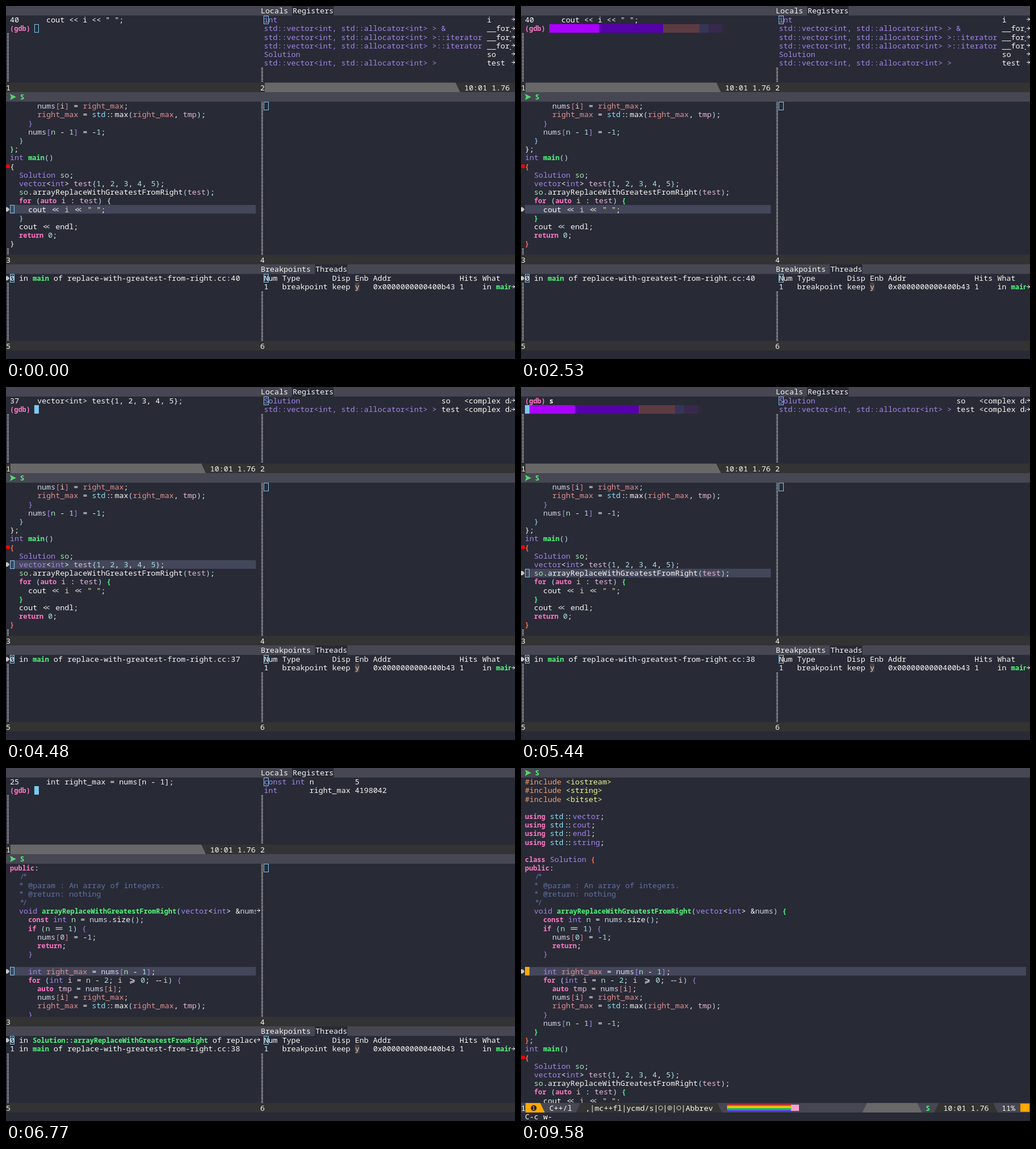
Write an HTML page with a canvas that moves like this. It is 899x623 px and loops after 9.71 s.

```html
<!DOCTYPE html>
<html lang="en">
<head>
<meta charset="utf-8">
<title>Debugger session</title>
<style>
html, body { margin: 0; height: 100%; overflow: hidden; background: #282a36; }
canvas { display: block; }
</style>
</head>
<body>
<canvas id="stage" width="899" height="623"></canvas>
<script>
const ctx = document.getElementById('stage').getContext('2d');
const LOOP = 9710, CELL = 8.04, BOLD_CELL = 7.2, ROW = 15.2, BAR = 16.8;
const LEFT = 7, RIGHT = 455.5, TEXT_W = 442;
const TOPS = [BAR, 152 + BAR, 456 + BAR], BARS = [152 - BAR, 456 - BAR, 608 - BAR];
const BG = '#282a36', HEADER = '#464752', HILITE = '#44475a', DARK = '#333333', GREY = '#686868';
const BLUE = '#7ec8f0', ORANGE = '#ffa800';

// Upper-case keys use the narrower bold face.
const INK = {
  w: '#f8f8f2', W: '#f8f8f2', P: '#ff79c6', G: '#50fa7b', v: '#a585ea', c: '#6272a4', o: '#f0a070',
  y: '#f1fa8c', b: '#8be0f0', n: '#a9e4dc', O: '#ff6e4a', m: '#e0808c', a: '#b4d8ee', r: '#e0908f',
  t: '#e6b8d8', s: '#a8e6b8', i: '#e8ccb8', u: '#d4d4e4', k: '#222222'
};

const SOURCE = `#include <iostream>
#include <string>
#include <bitset>

using std::vector;
using std::cout;
using std::endl;
using std::string;

class Solution {
public:
  /*
  * @param : An array of integers.
  * @return: nothing
  */
  void arrayReplaceWithGreatestFromRight(vector<int> &nums) {
    const int n = nums.size();
    if (n == 1) {
      nums[0] = -1;
      return;
    }

    int right_max = nums[n - 1];
    for (int i = n - 2; i >= 0; --i) {
      auto tmp = nums[i];
      nums[i] = right_max;
      right_max = std::max(right_max, tmp);
    }
    nums[n - 1] = -1;
  }
};
int main()
{
  Solution so;
  vector<int> test{1, 2, 3, 4, 5};
  so.arrayReplaceWithGreatestFromRight(test);
  for (auto i : test) {
    cout << i << " ";
  }
  cout << endl;
  return 0;
}`.split('\n');
const FIRST_LINE = 3, BREAK_LINE = 35;
const sourceLine = n => SOURCE[n - FIRST_LINE];

const TOKEN = /::|<<|==|>=|--|\/\*|\*\/|#\w+|"[^"]*"|<\w+>$|\w+| +|./g;
const KEYWORD = /^(using|class|public|const|if|return|for|auto)$/;
const TYPE = /^(int|void|vector|Solution)$/;
const NAMES = { right_max: 'r', test: 't', tmp: 't', so: 's', n: 's', i: 'i', nums: 'u', std: 'b', main: 'G' };
const DEPTH = ['O', 'G', 'v', 'm'];

function tokenKey(text, line) {
  if (/^ +(\/?\*)/.test(line)) return 'c';
  if (KEYWORD.test(text)) return 'P';
  if (TYPE.test(text) || (/^using/.test(line) && /^(cout|endl|string)$/.test(text))) return 'v';
  if (/^arrayReplace/.test(text) && /^  void/.test(line)) return 'G';
  if (text[0] === '#') return 'o';
  if (/^"|^<\w/.test(text)) return 'y';
  if (/^\d/.test(text)) return 'n';
  if (/^[()]$/.test(text)) return 'a';
  return NAMES[text] || 'w';
}

let depth = 0;
const TOKENS = SOURCE.map(line => line.match(TOKEN)?.map(text => {
  const token = { text, key: tokenKey(text, line), brace: /^[{}]$/.test(text) };
  if (/^[{[]$/.test(text)) token.key = DEPTH[depth++];
  if (/^[}\]]$/.test(text)) token.key = DEPTH[--depth];
  return token;
}) || []);

// Braces are recoloured as the editor revisits the file.
const BRACES = [{ 32: 'b', 33: 'G', 35: 'w', 37: 'a', 39: 'w', 41: 'b', 44: 'w' },
  { 32: 'b', 33: 'w', 37: 'a' }, { 37: 'a' }];

const VEC = 'std::vector<int, std::allocator<int> >', COMPLEX = '<complex data type>';
const frameLocals = n => ({ name: 10, value: 20, rows: [['const int', 'n', n], ['int', 'right_max', '4198042']] });
const LOCALS = [
  { name: 49, value: 61, rows: [['int', 'i', '5'], [VEC + ' &', '__for_range', COMPLEX],
    [VEC + '::iterator', '__for_begin', COMPLEX], [VEC + '::iterator', '__for_end', COMPLEX],
    ['Solution', 'so', COMPLEX], [VEC, 'test', COMPLEX]] },
  { name: 39, value: 44, rows: [['Solution', 'so', COMPLEX], [VEC, 'test', COMPLEX]] },
  frameLocals('0'), frameLocals('5')
];

const type = (time, typed = 's') => [[time, { typed }]];
const enter = (sent, printed, done, line, extra) => [
  [sent, { sent: true, glow: 1, fade: 0 }],
  [printed, { sent: false, typed: '', out: line, glow: 0 }],
  [done, { line, ...extra }]
];
const STEPS = [
  [0, { active: 2, solid: 0, hue: BLUE, line: 40, out: 40, top: 28, locals: 0, braces: 0, typed: '',
    sent: false, inner: false, hidden: false, full: false, glow: 0, fade: 0, echo: '' }],
  [670, { solid: 2 }], [730, { active: 4, solid: 0 }], [780, { solid: 4 }],
  [2090, { active: 3, solid: 3, hue: ORANGE }], [2160, { braces: 1 }], [2240, { glow: 3 }],
  [2410, { solid: 0, glow: 0 }], [2450, { active: 1, hue: BLUE, hidden: true }],
  [2530, { glow: 1 }], [2580, { hidden: false, solid: 1 }], [2790, { fade: 2790 }],
  ...type(3270, 'r'), ...enter(3560, 3620, 3680, 35, { locals: 1 }),
  ...type(4190), ...enter(4400, 4440, 4480, 37),
  ...type(4770), ...enter(4820, 4870, 4910, 38),
  ...type(5160), ...enter(5440, 5480, 5520, 18, { top: 13, inner: true, locals: 2, braces: 2 }),
  ...type(6030), ...enter(6300, 6340, 6340, 19),
  ...type(6490), ...enter(6530, 6570, 6570, 20),
  ...type(6690), ...enter(6730, 6770, 6770, 25, { locals: 3 }),
  [7630, { solid: 0 }], [7680, { active: 3, hue: ORANGE }], [7730, { solid: 3, glow: 3 }],
  [7940, { fade: 7940 }], [8180, { echo: 'C-c-' }], [8440, { echo: 'C-c w' }], [8480, { echo: 'C-c w-' }],
  [8640, { echo: 'C-c w m', glow: 0 }], [8690, { echo: '' }], [8730, { full: true, glow: 3, fade: 0 }],
  [8970, { fade: 8970 }], [9430, { echo: 'C-c-' }], [9580, { echo: 'C-c w-' }]
];

function rect(color, x, y, w, h) {
  ctx.fillStyle = color;
  ctx.fillRect(x, y, w, h);
}

function poly(color, ...points) {
  ctx.fillStyle = color;
  ctx.beginPath();
  for (const [x, y] of points) ctx.lineTo(x, y);
  ctx.fill();
}

function stroke(color, ...points) {
  ctx.strokeStyle = color;
  ctx.lineWidth = 1;
  ctx.beginPath();
  for (const [x, y] of points) ctx.lineTo(x, y);
  ctx.stroke();
}

const isBold = key => key < 'a';
const advance = (str, key) => str.length * (isBold(key) ? BOLD_CELL : CELL);

// Text in the row that starts at y.
function text(str, x, y, key = 'w', size = isBold(key) ? 12 : 13.4) {
  ctx.font = `${isBold(key) ? 'bold ' : ''}${size}px "Noto Sans Mono", monospace`;
  ctx.fillStyle = INK[key];
  ctx.fillText(str, x, y + 12.3);
}

// Alternating text and colour key: "plain|G|green|w|plain".
function rich(str, x, y) {
  let key = 'w';
  str.split('|').forEach((part, i) => {
    if (i % 2) { key = part; return; }
    text(part, x, y, key);
    x += advance(part, key);
  });
}

function clipped(x, y, w, h, paint) {
  ctx.save();
  ctx.beginPath();
  ctx.rect(x, y, w, h);
  ctx.clip();
  paint();
  ctx.restore();
}

function drawToken(str, x, y, key) {
  if (str === '==') {
    rect(INK[key], x + 2, y + 6, 12, 1);
    rect(INK[key], x + 2, y + 9, 12, 1);
  } else if (str === '>=') {
    text('⩾', x + 4, y, key);
  } else if (/^(::|<<|--|\/\*|\*\/)$/.test(str)) {
    text(str[0], x + 1.5, y, key);
    text(str[1], x + CELL - 1.5, y, key);
  } else {
    text(str, x, y, key);
  }
}

function cursor(x, y, state, win) {
  if (state.hidden && (win === 1 || win === 3)) return;
  const left = Math.floor(x), width = Math.ceil(x + 8) - left, top = Math.round(y);
  if (state.solid === win) return rect(state.hue, left, top, width, 15);
  ctx.strokeStyle = state.hue;
  ctx.lineWidth = 1;
  ctx.strokeRect(left + 0.5, top + 0.5, width - 1, 14);
}

// Fading light trail: [cells, colour] bands, consumed from the bright end.
const BANDS = [[11, '#aa00ff'], [14, '#5500aa'], [8, '#5d3b42'], [2, '#353558'], [3, '#37294c'], [1, '#2e2a3c']];
function beacon(x, y, state, t) {
  const skip = state.fade ? 5 * (1 + Math.floor((t - state.fade) / 40)) : 0;
  let cell = -skip;
  for (const [count, color] of BANDS) {
    const from = Math.max(0, cell), to = cell + count;
    if (to > from) rect(color, x + from * CELL, y, (to - from) * CELL, ROW);
    cell = to;
  }
}

function dots(x, from, to) {
  for (let y = from + 0.8; y < to - 0.8; y += 2.4) rect('#f8f8f2', x + 1.8, y, 3.2, 0.8);
}

function truncation(x, y) {
  const tip = x + 449, mid = Math.floor(y + 7) + 0.5;
  stroke(INK.w, [tip - 6, mid], [tip - 0.5, mid]);
  stroke(INK.w, [tip - 3.5, mid - 3], [tip - 0.5, mid], [tip - 3.5, mid + 3]);
}

const pointer = y => poly('#c4c4c4', [0, y + 4], [3, y + 4], [6.4, y + 7.7], [3, y + 11.5], [0, y + 11.5]);

function fileHeader(y) {
  rect(HEADER, 0, y, 899, BAR);
  poly('#50d870', [7, y + 3], [18, y + 8.5], [7, y + 14], [9, y + 8.5]);
  text('S', 25, y + 1, 'G');
}

function tabs(y, chosen, other) {
  const x = 450 + (chosen.length + 1) * CELL;
  rect(HEADER, 0, y, 899, BAR);
  rect(BG, x - 1, y, other.length * CELL + 1, BAR);
  text(chosen, 450, y + 1);
  text(other, x, y + 1);
}

function modeline(win, x, y, state) {
  const b = y + BAR;
  rect(DARK, x, y, 450, BAR);
  if (state.active === win) {
    poly(GREY, [x + 8, y], [x + 345, y], [x + 353, b], [x + 8, b]);
    text('10:01 1.76', x + 360.5, y + 1);
  }
  text(String(win), x, y + 1);
}

function drawCode(state, t, y0, top, bottom, right) {
  clipped(0, y0, right, bottom - y0, () => {
    for (let n = top; sourceLine(n) !== undefined; n++) {
      const y = y0 + (n - top) * ROW;
      if (y > bottom) break;
      if (n === state.line) {
        rect(HILITE, LEFT, y, right - LEFT, ROW);
        if (state.glow === 3) beacon(LEFT, y, state, t);
        cursor(LEFT, y, state, 3);
      }
      let x = LEFT;
      for (const token of TOKENS[n - FIRST_LINE]) {
        const key = token.brace && BRACES[state.braces][n] || token.key;
        drawToken(token.text, x, y, key);
        x += advance(token.text, key);
      }
      if (n === BREAK_LINE) {
        ctx.fillStyle = '#ff0000';
        ctx.beginPath();
        ctx.arc(3.5, y + 7.6, 3.5, 0, 7);
        ctx.fill();
      }
      if (n === state.line) pointer(y);
    }
  });
}

function drawConsole(state, t) {
  const top = TOPS[0], next = top + ROW, inputX = 50;
  const promptY = state.sent ? top : next;
  const x = state.sent ? LEFT : inputX + advance(state.typed, 'W');
  clipped(0, top, TEXT_W, 118, () => {
    if (state.glow === 1) beacon(x, next, state, t);
    cursor(x, next, state, 1);
    if (!state.sent) text(`${state.out}  ${sourceLine(state.out)}`, LEFT, top);
    text('(gdb)', LEFT, promptY, 'P');
    text(state.typed, inputX, promptY, 'W');
  });
  if (!state.sent && sourceLine(state.out).length > 51) truncation(0, top);
  dots(0, next + ROW, BARS[0]);
}

function drawLocals(state) {
  const { name, value, rows } = LOCALS[state.locals], top = TOPS[0];
  cursor(RIGHT, top, state, 2);
  rows.forEach(([kind, label, content], i) => {
    const y = top + i * ROW;
    clipped(449, y, TEXT_W + 1, ROW + 2, () => {
      text(kind, RIGHT, y, 'v');
      text(label, RIGHT + name * CELL, y);
      text(content, RIGHT + value * CELL, y);
    });
    if (value + content.length > 54) truncation(450, y);
  });
  dots(449, top + rows.length * ROW, BARS[0]);
}

function drawStack(state) {
  const y = TOPS[2], file = ' of replace-with-greatest-from-right.cc:';
  const frames = state.inner
    ? ['Solution::arrayReplaceWithGreatestFromRight|w|' + file + state.line, 'main|w|' + file + 38]
    : ['main|w|' + file + state.line];
  cursor(LEFT, y, state, 5);
  pointer(y);
  clipped(0, y, TEXT_W, 100, () =>
    frames.forEach((frame, i) => rich(`${i} in |G|${frame}`, LEFT, y + i * ROW)));
  if (state.inner) truncation(0, y);
  dots(0, y + frames.length * ROW, BARS[2]);
}

function drawBreakpoints(state) {
  const y = TOPS[2];
  cursor(RIGHT, y, state, 6);
  rect('#4a4043', RIGHT + 20 * CELL, y + ROW, 8, 15);
  clipped(449, y, TEXT_W + 1, 100, () => {
    text('Num Type       Disp Enb Addr               Hits What', RIGHT, y);
    rich('1   breakpoint keep |i|y|w|   0x0000000000400b43 1    in |G|main', RIGHT, y + ROW);
  });
  truncation(450, y + ROW);
  dots(449, y + 2 * ROW, BARS[2]);
}

function drawSplit(state, t) {
  tabs(0, 'Locals', 'Registers');
  fileHeader(152);
  tabs(456, 'Breakpoints', 'Threads');
  drawConsole(state, t);
  drawLocals(state);
  drawCode(state, t, TOPS[1], state.top, BARS[1], TEXT_W - 0.5);
  if (state.inner) truncation(0, TOPS[1] + 5 * ROW);
  else dots(0, TOPS[1] + 17 * ROW, BARS[1]);
  cursor(RIGHT, TOPS[1], state, 4);
  dots(449, TOPS[1], BARS[1]);
  drawStack(state);
  drawBreakpoints(state);
  BARS.forEach((y, i) => {
    modeline(2 * i + 1, 0, y, state);
    modeline(2 * i + 2, 449, y, state);
  });
}

// Minor-mode marks: a ring, with a letter inside when one is given.
function ring(x, y, letter = '') {
  ctx.strokeStyle = INK.w;
  ctx.lineWidth = 0.9;
  ctx.beginPath();
  ctx.arc(x + 4, y + 7.8, 3.6, 0, 7);
  ctx.stroke();
  text(letter, x + 2.1, y - 2.3, 'w', 6.5);
}

function drawFull(state, t) {
  const y = BARS[2], b = y + BAR;
  const band = (color, topLeft, topRight, left, right) =>
    poly(color, [topLeft, y], [topRight, y], [right, b], [left, b]);
  fileHeader(0);
  drawCode(state, t, TOPS[0], FIRST_LINE, y, 892);
  rect(HEADER, 0, y, 899, BAR);
  band(ORANGE, 8, 34, 8, 42);
  band(DARK, 105, 347, 97, 355);
  band(GREY, 611, 700, 603, 708);
  band(DARK, 738, 834, 730, 842);
  rect(ORANGE, 882, y + 1, 16, 14.5);
  ['#ff2020', '#ff9800', '#fff000', '#30e020', '#20a0ff', '#6838ff'].forEach((color, i) =>
    rect(color, 364, y + 2.5 + i * 2, 113, 2));
  rect('#f4a0d0', 477, y + 3, 14, 11);
  text('1', 0, y + 1);
  text('❶', 16.5, y + 1, 'k');
  text('C++/l', 50, y + 1);
  text(',|mc++fl|ycmd/s| | | |Abbrev', 114, y + 1);
  ['', 'a', ''].forEach((letter, i) => ring(114 + (16 + 2 * i) * CELL, y + 1, letter));
  text('S', 715, y + 1, 'G');
  text('10:01 1.76', 746, y + 1);
  text('11%', 849, y + 1);
}

function draw() {
  const t = performance.now() % LOOP;
  const state = Object.assign({}, ...STEPS.filter(([time]) => time <= t).map(([, change]) => change));
  rect(BG, 0, 0, 899, 623);
  (state.full ? drawFull : drawSplit)(state, t);
  text(state.echo, LEFT, 607.5);
  requestAnimationFrame(draw);
}
draw();
</script>
</body>
</html>
```
